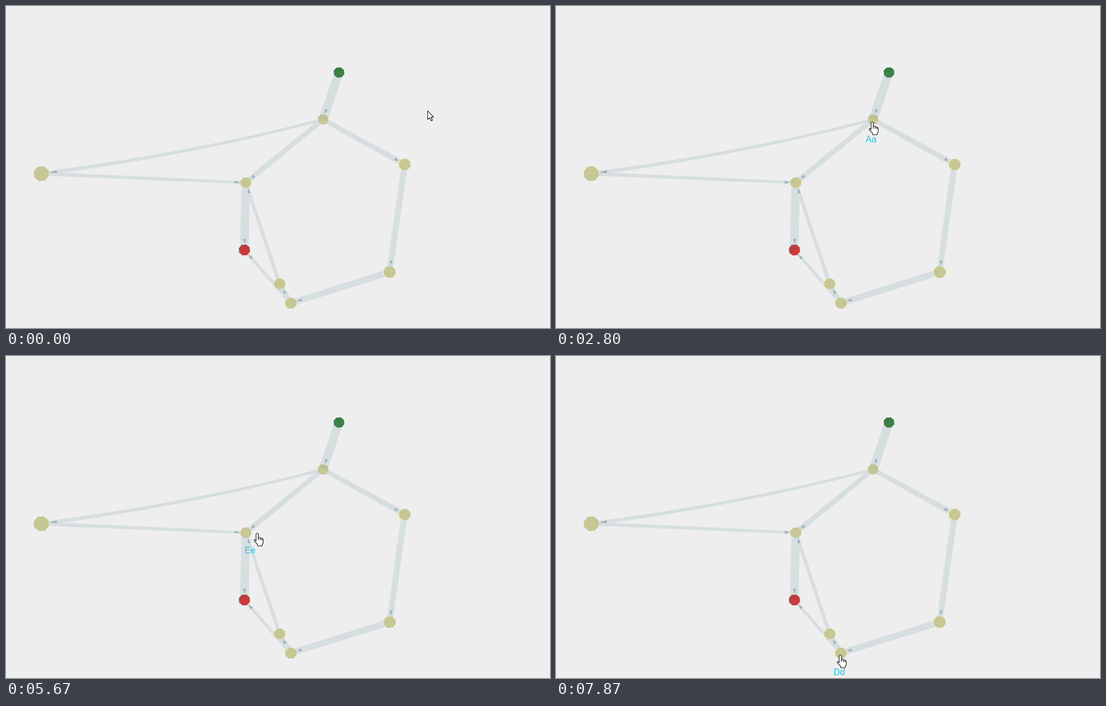
Recreate the animation shown at these times as an HTML page. Size 972 by 576 pixels, loop 8 s.

```html
<!DOCTYPE html>
<html lang="en">
<head>
<meta charset="utf-8">
<title>Node graph</title>
<style>
html, body { margin: 0; width: 100%; height: 100%; overflow: hidden; background: #eee; }
svg { display: block; width: 972px; height: 576px; }
text { font: 16px "Liberation Sans", Arial, sans-serif; fill: #22c6e6; text-anchor: middle; }
.cursor { fill: #fff; stroke: #111; stroke-width: 1.1; stroke-linejoin: round; }
</style>
</head>
<body>
<svg viewBox="0 0 972 576">
  <g id="graph"></g>
  <text id="label"></text>
  <path id="arrow" class="cursor" d="M.5 .5V16.2L4 12.8L6.6 18.5L9 17.4L6.5 11.9H11Z"/>
  <g id="hand" class="cursor">
    <path d="M-2 14V2a2 2 0 0 1 4 0V8q3.3-1 3.5 1q2.6-1 3 1q2.2-.6 2.2 2V16.5q0 2-2 4V22.7H1V20.7L-4.8 14.2q-1.4-2.6 .7-2.7q1 0 2.1 2Z"/>
    <path d="M2 8V12M5.5 9V12.5M8.5 10V13" fill="none"/>
  </g>
</svg>
<script>
const LOOP = 8000, STEP = 1000 / 15;
const $ = id => document.getElementById(id);
const OLIVE = '#c6c794';

const nodes = {
  start: { x: 595, y: 119, r: 10, fill: '#3f8249' },
  a: { x: 566.5, y: 203, r: 9.8, fill: OLIVE, name: 'Aa' },
  b: { x: 712.5, y: 283.5, r: 11, fill: OLIVE, name: 'Bb', rim: 2 },
  c: { x: 685.5, y: 476, r: 11.3, fill: OLIVE, name: 'Cc', rim: 1.5 },
  d: { x: 509, y: 531.5, r: 10.7, fill: OLIVE, name: 'Dd', rim: 1.5 },
  f: { x: 489, y: 497, r: 10.6, fill: OLIVE, rim: 1 },
  e: { x: 428.5, y: 316, r: 10.3, fill: OLIVE, name: 'Ee', rim: .6 },
  end: { x: 426, y: 436.5, r: 10.5, fill: '#cb3a3b' },
  far: { x: 63, y: 300, r: 14.2, fill: OLIVE }
};

// from, to, start width, end width, light side, bend x, bend y
const edges = [
  ['start', 'a', 15, 16],
  ['a', 'b', 8, 10, .8],
  ['b', 'c', 10, 10, -1.5],
  ['c', 'd', 11.5, 11, .8],
  ['d', 'f', 9, 8, -1],
  ['d', 'end', 6, 5, -.5],
  ['f', 'e', 6, 5.5, -.5],
  ['e', 'end', 14, 15, -1.6],
  ['a', 'e', 8.5, 9, -.8],
  ['a', 'far', 5, 6.5, 0, 325, 266],
  ['far', 'e', 6.5, 5, 0]
];

const poly = (pts, fill, extra = '') =>
  `<polygon points="${pts.map(p => p.map(v => v.toFixed(1)))}" fill="${fill}" ${extra}/>`;

function unit(p, q) {
  const dx = q.x - p.x, dy = q.y - p.y, len = Math.hypot(dx, dy);
  return { x: dx / len, y: dy / len };
}

function band(p, q, w1, w2, mid, fill, shift = 0) {
  const u = unit(p, mid), v = unit(mid, q), m = unit(p, q);
  const side = (o, n, d) => `${(o.x - n.y * d + shift).toFixed(1)} ${(o.y + n.x * d).toFixed(1)}`;
  return `<path fill="${fill}" d="M${side(p, u, w1 / 2)}Q${side(mid, m, (w1 + w2) / 4)} ${side(q, v, w2 / 2)}` +
    `L${side(q, v, -w2 / 2)}Q${side(mid, m, -(w1 + w2) / 4)} ${side(p, u, -w1 / 2)}Z"/>`;
}

function drawEdge([from, to, w1, w2, light = 0, bx, by]) {
  const p = nodes[from], q = nodes[to];
  const mid = bx ? { x: bx, y: by } : { x: (p.x + q.x) / 2, y: (p.y + q.y) / 2 };
  return (light ? band(p, q, w1, w2, mid, '#e2e8e9', light) : '') +
    band(p, q, w1, w2, mid, '#d6dee0');
}

function drawHead([from, to, , , , bx, by]) {
  const q = nodes[to], v = unit(bx ? { x: bx, y: by } : nodes[from], q);
  const len = to === 'far' ? 13 : 8.5, gap = q.r + .8;
  const at = (back, d) => [q.x - v.x * back - v.y * d, q.y - v.y * back + v.x * d];
  return poly([at(gap, 0), at(gap + len, 2.7), at(gap + len, -2.7)], '#9eb1ba');
}

const ring = (n, dx = 0) => Array.from({ length: 8 }, (_, i) => {
  const a = i * Math.PI / 4 + .3;
  return [n.x + dx + n.r * Math.cos(a), n.y + n.r * Math.sin(a) * .97];
});

function drawNode(n) {
  return (n.rim ? poly(ring(n, -n.rim), '#f0f0bb') : '') + poly(ring(n), n.fill);
}

const { start, end, a } = nodes;
$('graph').innerHTML = edges.map(drawEdge).join('') + edges.map(drawHead).join('') +
  Object.values(nodes).map(drawNode).join('') +
  poly([...ring(start).slice(4), [start.x, start.y]], '#337a3e', 'opacity=".7"') +
  poly([...ring(end).slice(4), [end.x + 9, end.y]], '#a84446', 'opacity=".6"') +
  poly([...ring(a).slice(4), [a.x + 8, a.y]], '#b5ba92', 'opacity=".55"');

// Pointer stops: time, x, y
const path = [
  [0, 753, 187], [400, 700, 155], [870, 635, 119], [1200, 607, 113],
  [1480, 590, 118], [1730, 583, 134], [2200, 572, 172], [2600, 565, 207.5],
  [3070, 565, 207.5], [3330, 645, 190], [3640, 752, 232], [3860, 722, 279],
  [4000, 719.5, 280], [4150, 732, 258], [4350, 620, 206], [4550, 460, 320],
  [4650, 452, 367], [4730, 470, 361], [5100, 446, 328], [5400, 438, 317],
  [5600, 438, 317], [5670, 449.5, 317], [6070, 555, 372], [6500, 660, 433],
  [6800, 682, 474], [7000, 683, 479], [7070, 678, 484], [7330, 590, 540],
  [7600, 514, 538], [7800, 508, 535], [8000, 508, 535]
];

// Smooth tangent that never overshoots a stop
function slope(i, k) {
  if (!i || i === path.length - 1) return 0;
  const [p, q, r] = [path[i - 1], path[i], path[i + 1]];
  const s = (q[k] - p[k]) / (q[0] - p[0]), t = (r[k] - q[k]) / (r[0] - q[0]);
  return s * t <= 0 ? 0 : 2 * s * t / (s + t);
}

function pointer(t) {
  t = Math.max(0, t);
  let i = 0;
  while (i < path.length - 2 && path[i + 1][0] <= t) i++;
  const p = path[i], q = path[i + 1], d = q[0] - p[0], u = (t - p[0]) / d;
  const [x, y] = [1, 2].map(k =>
    p[k] * (1 + 2 * u) * (1 - u) ** 2 + q[k] * u * u * (3 - 2 * u) +
    d * u * (1 - u) * (slope(i, k) * (1 - u) - slope(i + 1, k) * u));
  return { x, y };
}

function render(ms) {
  const t = Math.floor((ms % LOOP + 5) / STEP) * STEP;
  const now = pointer(t), last = pointer(t - STEP - 5);
  const hit = Object.values(nodes).find(n =>
    n.name && Math.hypot(n.x - last.x, n.y - last.y) < n.r + 1);
  const move = `translate(${now.x.toFixed(1)} ${now.y.toFixed(1)})`;
  $('arrow').setAttribute('transform', move);
  $('hand').setAttribute('transform', move);
  $('arrow').style.display = hit ? 'none' : '';
  $('hand').style.display = hit ? '' : 'none';
  $('label').textContent = hit ? hit.name : '';
  $('label').setAttribute('x', Math.round(last.x - 2));
  $('label').setAttribute('y', Math.round(last.y + 36));
}

const t0 = performance.now();
function tick() {
  render(performance.now() - t0);
  requestAnimationFrame(tick);
}
tick();
</script>
</body>
</html>
```
